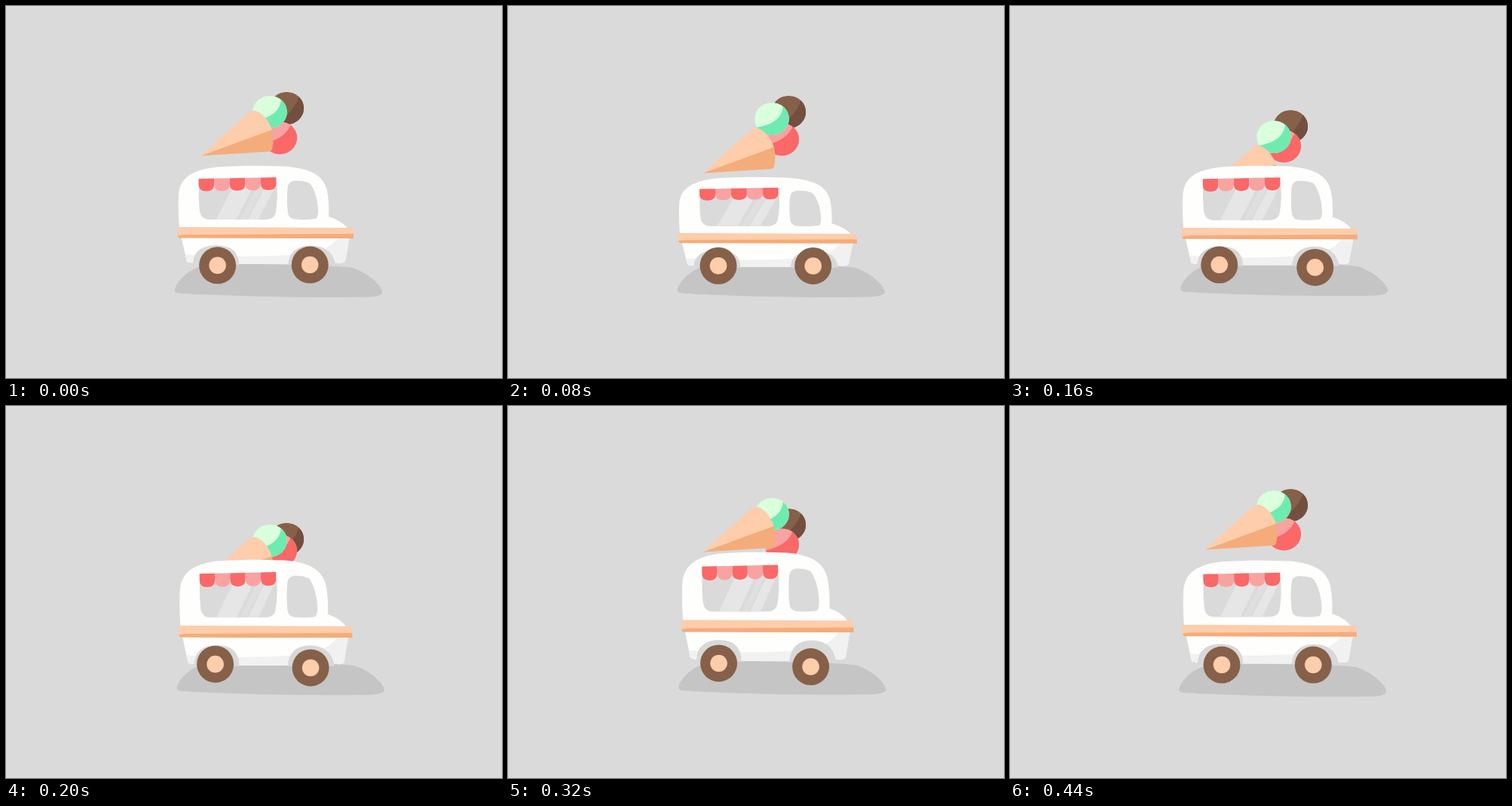
Write an HTML page that moves like this. It is 658 px wide and 493 px high and loops after 480 ms.

```html
<!DOCTYPE html>
<html lang="en">
<head>
<meta charset="utf-8">
<title>Ice cream van</title>
<style>
  html, body { margin: 0; width: 100%; height: 100%; overflow: hidden; background: #dadada; }
  svg { display: block; width: 100vw; height: 100vh; }
</style>
</head>
<body>
<svg viewBox="0 0 658 493">
  <defs>
    <clipPath id="paneClip">
      <path id="pane" d="M256 234Q255 255 257 272Q259 283 270 283H343Q357 283 358 272Q361 254 359 234Z"/>
    </clipPath>
    <clipPath id="bodyClip">
      <path id="lower" d="M231 300L240 339Q245 341 252 340L310 342H376L436 340Q448 342 450 338L457 300Z"/>
    </clipPath>
    <clipPath id="ball"><ellipse rx="22.8" ry="21.6"/></clipPath>
  </defs>

  <path id="shadow" fill="#c5c5c5" d="M224 377C225 367 239 352 256 346C285 340 330 342 370 343C405 344 435 344 459 347C476 352 496 367 499 378C500 384 491 386 470 386C390 387 310 385 248 382C234 381 224 382 224 377Z"/>

  <g id="choc"><g transform="translate(372.3 135.5)" clip-path="url(#ball)">
    <path fill="#866049" d="M-25-25H25V25H-25Z"/>
    <path fill="#724f3e" d="M17-19Q14-1-8 16V30H30V-19Z"/>
  </g></g>
  <g id="pink"><g transform="translate(363.3 174.8)" clip-path="url(#ball)">
    <path fill="#f9a2a2" d="M-25-25H25V25H-25Z"/>
    <path fill="#fa6868" d="M15-19Q8 2-24 8V30H30V-19Z"/>
  </g></g>
  <g id="mint"><g transform="translate(350 140.5)" clip-path="url(#ball)">
    <path fill="#d9ffdc" d="M-25-25H25V25H-25Z"/>
    <path fill="#6eebb0" d="M15-19Q15 7-24 12V30H30V-19Z"/>
  </g></g>
  <g id="cone">
    <path fill="#fecdab" d="M259 198L319 144Q327 138 332 139Q344 144 351 159L353 165Z"/>
    <path fill="#f4ac7b" d="M259 198.500L353 164Q356 178 353 190Q352 193 348 193Z"/>
  </g>

  <g id="van">
    <path fill="#fefefd" d="M230 296Q228 272 229 251C230 227 248 217 279 213.500C308 211.500 340 211.500 370 212.500C400 215 421 222 426 245Q429 260 428 279Q447 285 454 296Z"/>
    <use href="#lower" fill="#fefefd"/>
    <g clip-path="url(#bodyClip)" fill="#f1f1f1">
      <path d="M230 329Q330 335 405 328Q432 321 442 305H462V350H230Z"/>
    </g>
    <g fill="#d8d8d8">
      <path d="M248 343Q248 318 278 317Q309 317 309 343Z"/>
      <path d="M374 343Q376 318 404 317.500Q433 318 437 343Z"/>
    </g>
    <use href="#pane" fill="#dadada"/>
    <g clip-path="url(#paneClip)">
      <path fill="#e6e6e6" d="M303 236H330L305 284H278Z"/>
      <path fill="#dfdfdf" d="M335 236H344L318 284H309Z"/>
      <path fill="#e6e6e6" d="M346 236H359L334 284H320Z"/>
    </g>
    <path fill="#dadada" d="M373.500 242Q374 232 383 231.500Q396 231 403 235Q412 246 414 268Q415 279 411 282Q398 284 383 282.500Q375 282 374 274Q372 258 373.500 242Z"/>
    <g id="awning"></g>
    <path fill="#fecdab" d="M229 293L459 294Q461 295 461 303L228 304Q226 297 229 293Z"/>
    <path fill="#f4ac7b" d="M228 304L240 303L461 302V308Q350 308 231 307.500Q228 307 228 304Z"/>
  </g>

  <g id="rear"><circle r="24.500" fill="#866049"/><circle r="11.300" fill="#fecdab"/></g>
  <g id="front"><circle r="24.500" fill="#866049"/><circle r="11.300" fill="#fecdab"/></g>
</svg>

<script>
  const STEP = 40, COUNT = 12;
  const $ = id => document.getElementById(id);

  // Vertical offsets of the toppings, one per step
  const bounce = {
    cone: [0, 7, 23, 41, 46, 35, 18, 3, -5, -10, -11, -8],
    mint: [0, 2, 9, 18, 33, 38, 32, 17, 3, -5, -8, -7],
    choc: [0, 1, 5, 11, 24, 41, 50, 39, 22, 8, -1, -4],
    pink: [0, 0, 2, 5, 11, 17, 21, 17, 9, 1, -4, -5]
  };
  // Heights of the roof and of the belt line
  const roof = [212, 224, 227, 225, 212, 204, 199, 195, 194, 196, 199, 205];
  const belt = [293, 299, 301, 300, 294, 291, 288, 285, 283.5, 284.5, 287, 290];

  for (let i = 0; i < 5; i++) {
    const flap = document.createElementNS("http://www.w3.org/2000/svg", "path");
    const x = 255.5 + i * 20.6, y = 229 - i * 0.4;
    flap.setAttribute("d", `M${x} ${y}l20.6 -.4v8q0 9 -10.300 9q-10.300 0 -10.300 -9z`);
    flap.setAttribute("fill", i % 2 ? "#f9a2a2" : "#fa6868");
    $("awning").append(flap);
  }

  const move = (id, x, y) => $(id).setAttribute("transform", `translate(${x} ${y})`);

  function draw(k) {
    const wave = peak => Math.cos((k - peak) / COUNT * 2 * Math.PI);
    for (const id in bounce) move(id, 0, bounce[id][k]);

    const sy = (belt[k] - roof[k]) / (belt[0] - roof[0]);
    const sx = 1 + (1 - sy) * 0.19;
    $("van").setAttribute("transform",
      `matrix(${sx} 0 0 ${sy} ${344 * (1 - sx)} ${roof[k] - roof[0] * sy})`);

    move("rear", 279.3 + 1.7 * wave(10.7), 342.6 + 1.7 * wave(1.5));
    move("front", 403.2 + 1.8 * wave(3), 345 + 2 * wave(5.5));
    move("shadow", 1.5 - 1.5 * wave(0), 2 * wave(0.9) - 2);
  }

  const start = performance.now();
  function tick() {
    draw(Math.floor((performance.now() - start) / STEP) % COUNT);
    requestAnimationFrame(tick);
  }
  tick();
</script>
</body>
</html>
```
